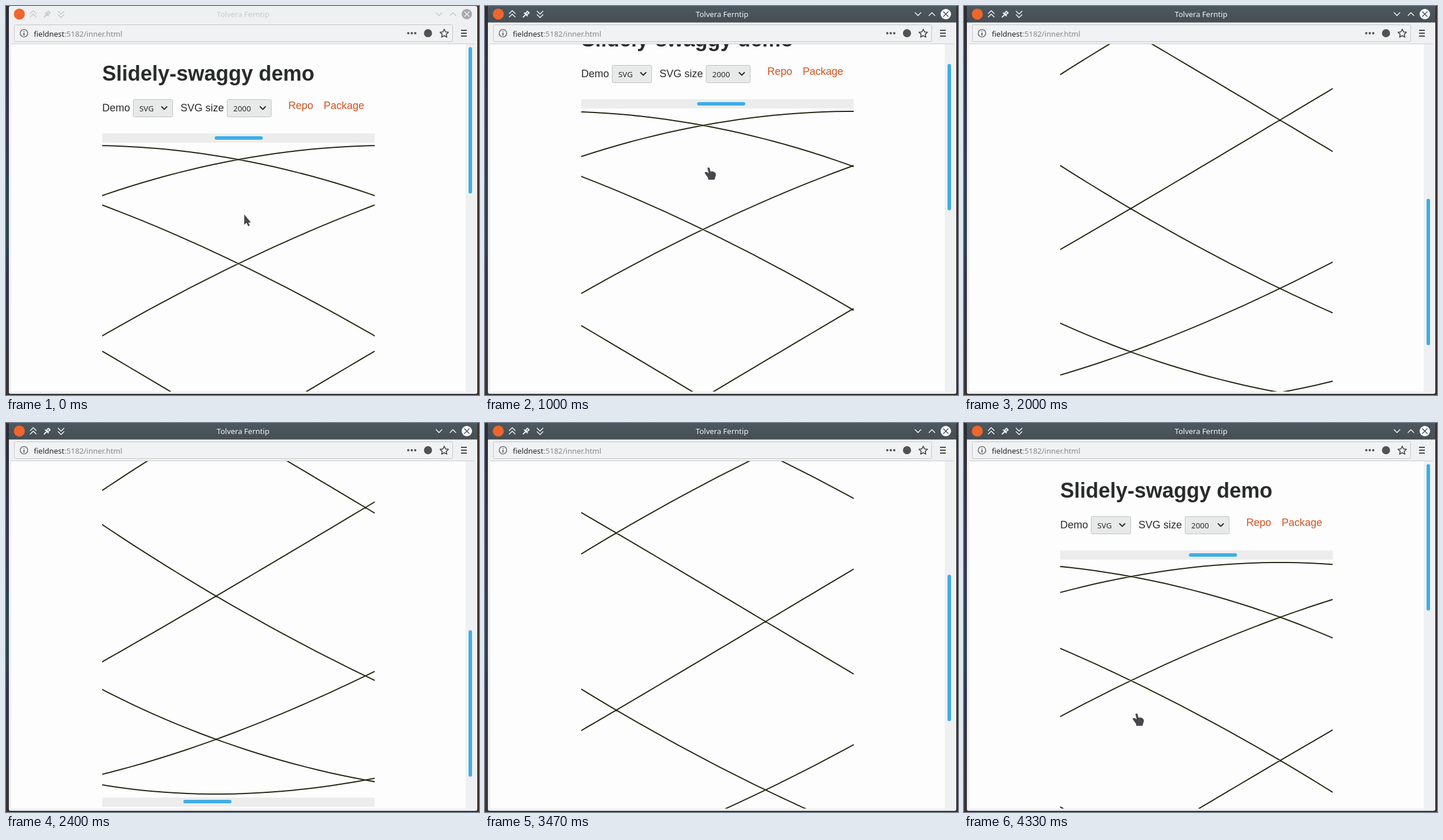
Recreate the animation shown at these times as an HTML page. Size 816 by 672 pixels, loop 4.39 s.

```html
<!DOCTYPE html>
<html lang="en">
<head>
<meta charset="utf-8">
<title>Drag scrolling</title>
<style>
  html, body { margin: 0; width: 100%; height: 100%; overflow: hidden; background: #30303a; }
  svg { display: block; }
  .ui { font: 13px "Noto Sans", sans-serif; }
  .page { font: 18px "Liberation Sans", Arial, sans-serif; fill: #292b2b; }
  .heading { font-size: 36px; font-weight: bold; }
  .link { fill: #cf5321; }
  .select { font: 13.4px "Noto Sans", sans-serif; }
  .box { fill: #e8eaea; stroke: #bfc1c2; }
  .track { fill: #ececec; }
  .thumb { fill: #3daee6; }
  .line { fill: none; stroke-linecap: round; stroke-linejoin: round; }
  .icon { stroke: #45474b; stroke-width: 1.6; }
  #waves { fill: none; stroke: #23260f; stroke-width: 2; }
  .cursor { fill: #45484c; stroke: #f4f4f4; stroke-width: 1.4; paint-order: stroke; }
</style>
</head>
<body>
<svg width="816" height="672" viewBox="0 0 816 672">
  <defs>
    <linearGradient id="desk" x2="0" y2="1">
      <stop offset="0" stop-color="#2c2c34"/>
      <stop offset=".3" stop-color="#35354e"/>
      <stop offset=".6" stop-color="#2b4250"/>
      <stop offset=".7" stop-color="#32324a"/>
      <stop offset="1" stop-color="#363434"/>
    </linearGradient>
    <linearGradient id="bar" x2="0" y2="1">
      <stop offset="0" stop-color="#4c585f"/>
      <stop offset="1" stop-color="#454e55"/>
    </linearGradient>
    <clipPath id="view"><rect x="9" y="66" width="784" height="600"/></clipPath>
    <clipPath id="pane"><rect x="166" y="60" width="470" height="1300"/></clipPath>
    <g id="buttons" class="line" stroke-width="1.5">
      <path d="M42 13l5-5 5 5M42 19l5-5 5 5M90 9l5 5 5-5M90 15l5 5 5-5M742 11.5l5 5 5-5M766 16.5l5-5 5 5"/>
      <path d="M66 19l4-4M68 12l5 5M70 13l3-4 3 3-4 3z" stroke-width="2"/>
    </g>
  </defs>

  <rect width="816" height="672" fill="url(#desk)"/>
  <rect x="813" width="3" height="672" fill="#3c302a"/>
  <rect x="5" width="808" height="670" rx="3" fill="#eff0f1"/>

  <g class="ui" text-anchor="middle">
    <g fill="#c6cacc">
      <use href="#buttons" stroke="#c6cacc" fill="none"/>
      <text x="409" y="19">Tolvera Ferntip</text>
      <circle cx="795" cy="14" r="9" fill="#a5aaad"/>
      <path class="line" d="M791 10l8 8M799 10l-8 8" stroke="#eff0f1" stroke-width="1.5"/>
    </g>
    <g id="active" fill="#f3f4f4">
      <path d="M5 28.500V3q0-3 3-3h802q3 0 3 3v25.500z" fill="url(#bar)"/>
      <use href="#buttons" stroke="#f3f4f4" fill="none"/>
      <text x="409" y="19">Tolvera Ferntip</text>
      <circle cx="795" cy="14" r="9" fill="#fcfcfc"/>
      <path class="line" d="M791 10l8 8M799 10l-8 8" stroke="#475057" stroke-width="1.5"/>
    </g>
    <circle cx="23" cy="14" r="9.500" fill="#f0652b"/>
  </g>

  <rect x="14.500" y="32.500" width="756" height="29" rx="2" fill="#f1f2f3" stroke="#c3c5c6"/>
  <path d="M9 65.500h800" stroke="#cbcccd"/>
  <text class="ui" x="48" y="53" fill="#232629">fieldnest<tspan fill="#858789">:5182/inner.html</tspan></text>
  <g class="line icon">
    <circle cx="31" cy="47" r="6.500" stroke-width="1.200"/>
    <path d="M31 46.500v4M31 43.500v.1"/>
    <path d="M756 40l2.200 4.700 5 .6-3.700 3.500 1 5-4.500-2.500-4.500 2.500 1-5-3.700-3.500 5-.6z"/>
    <path d="M785 42h10M785 47h10M785 52h10" stroke-width="2" stroke-linecap="butt"/>
  </g>
  <g fill="#505256">
    <circle cx="694" cy="47" r="2"/><circle cx="700" cy="47" r="2"/><circle cx="706" cy="47" r="2"/>
    <circle cx="728" cy="47" r="7"/>
  </g>

  <rect x="9" y="66" width="784" height="600" fill="#fdfdfd"/>
  <g clip-path="url(#view)">
    <g id="doc" class="page">
      <text class="heading" x="166" y="129">Slidely-swaggy demo</text>
      <text x="166" y="182">Demo</text>
      <text x="301" y="182">SVG size</text>
      <rect class="box" x="219.500" y="161.500" width="68" height="30" rx="2"/>
      <rect class="box" x="381.500" y="161.500" width="76" height="30" rx="2"/>
      <text class="select" x="230" y="182">SVG</text>
      <text class="select" x="392" y="182">2000</text>
      <path class="line" d="M268.500 174l4.500 4.500 4.500-4.500M438.500 174l4.500 4.500 4.500-4.500" stroke="#292b2b" stroke-width="2"/>
      <text class="link" x="487" y="178">Repo</text>
      <text class="link" x="548" y="178">Package</text>
      <rect class="track" x="166" y="220" width="470" height="16"/>
      <rect class="track" x="166" y="1237" width="470" height="16"/>
      <g id="hthumbs" class="thumb">
        <rect x="360" y="225" width="83" height="6" rx="3"/>
        <rect x="360" y="1241" width="83" height="6" rx="3"/>
      </g>
      <g clip-path="url(#pane)"><path id="waves"/></g>
    </g>
  </g>
  <rect id="vthumb" class="thumb" x="798" y="71" width="6" height="253" rx="3"/>

  <path id="arrow" class="cursor" d="M411 360v18l4-3.500 3 6 2.500-1.500-2.500-5h4.500z"/>
  <path id="hand" class="cursor" d="M-1 0Q-2.500 0-2 2L0 10-3 8Q-7 7-7 9.500L-1 18V21H10L11 17Q13 13 12 10.500L10 8Q6 6 3 7L1.500 1Q1 0-1 0Z"/>
</svg>

<script>
const LOOP = 4390, STEP = 1000 / 15;
const $ = id => document.getElementById(id);
const move = (id, x, y) => $(id).setAttribute("transform", `translate(${x} ${y})`);

// A 5:6 Lissajous figure, 2000 by 1000 with a margin of 5.
const POINTS = 1500;
let d = "M";
for (let i = 0; i < POINTS; i++) {
  const a = 2 * Math.PI * i / POINTS;
  const x = 401 + 995 * Math.sin(5 * a);
  const y = 736 + 495 * Math.sin(6 * a);
  d += `${x.toFixed(2)} ${y.toFixed(2)} `;
}
$("waves").setAttribute("d", d + "Z");

// time, sideways drag, page scroll, pointer height
const keys = [
  [667, 0, 0, 359], [1333, -49, 178, 137], [1667, 30, 355, -8],
  [2000, 144, 539, -190], [2333, 215, 588, -240], [2733, 229, 596, -250],
  [3133, 229, 596, -250], [3333, 185, 545, -180], [3533, 20, 290, 50],
  [3667, -100, 60, 305], [3733, -142, 0, 405], [3933, -158, 0, 485],
  [4333, -113, 0, 502]
];

const rate = (i, c) => keys[i] && keys[i + 1]
  ? (keys[i + 1][c] - keys[i][c]) / (keys[i + 1][0] - keys[i][0]) : 0;

// Monotone tangent: flat at turning points.
function tangent(i, c) {
  const a = rate(i - 1, c), b = rate(i, c);
  return a * b > 0 ? 2 * a * b / (a + b) : 0;
}

function valueAt(t, c) {
  const last = keys.length - 1;
  if (t <= keys[0][0]) return keys[0][c];
  if (t >= keys[last][0]) return keys[last][c];
  const i = keys.findIndex(k => k[0] > t) - 1;
  const [p, q] = [keys[i], keys[i + 1]];
  const h = q[0] - p[0], s = (t - p[0]) / h, r = 1 - s;
  return r * r * (1 + 2 * s) * p[c] + s * s * (3 - 2 * s) * q[c]
    + h * s * r * (r * tangent(i, c) - s * tangent(i + 1, c));
}

function draw(now) {
  const step = Math.floor((now % LOOP + 4) / STEP);
  const t = step * STEP;
  const x = valueAt(t, 1), scroll = valueAt(t, 2), y = valueAt(t, 3);

  $("active").style.opacity = Math.min(1, step / 7);
  $("arrow").style.display = step ? "none" : "";
  $("hand").style.display = step ? "" : "none";
  move("hand", 411 + Math.round(x), Math.round(y));
  move("doc", 0, -Math.round(scroll));
  move("waves", Math.round(x), 0);
  move("hthumbs", -Math.round(x / 4.08), 0);
  move("vthumb", 0, Math.round(scroll * 0.486));
}

function tick() {
  draw(performance.now());
  requestAnimationFrame(tick);
}
tick();
</script>
</body>
</html>
```
